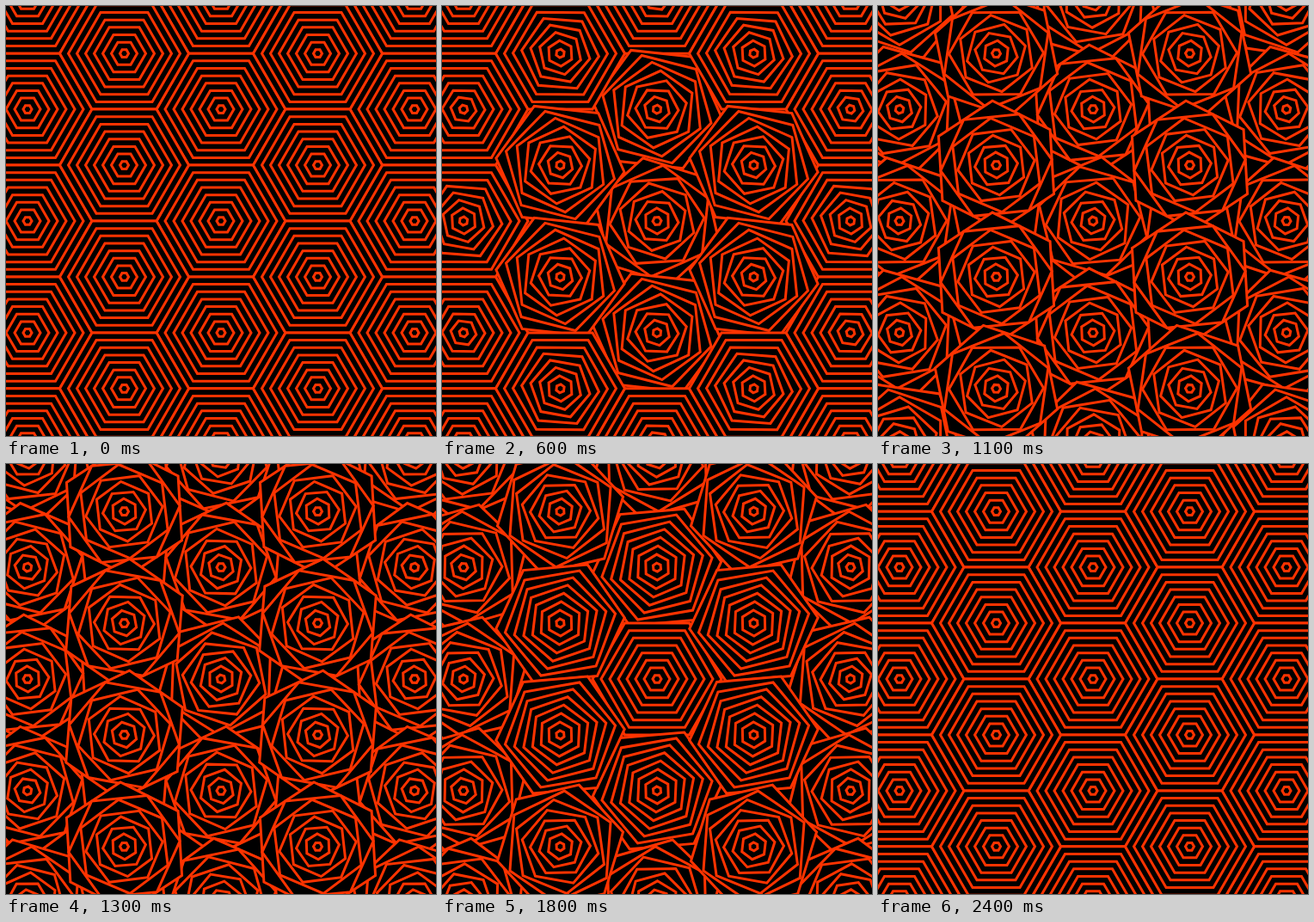
An HTML page with a canvas for the animation above (2.5 s loop, 500 by 500 pixels).

```html
<!DOCTYPE html>
<html lang="en">
<head>
<meta charset="utf-8">
<title>Turning hexagons</title>
<style>
  html, body { margin: 0; width: 100%; height: 100%; overflow: hidden; background: #000; }
  canvas { display: block; }
</style>
</head>
<body>
<canvas id="stage" width="500" height="500"></canvas>
<script>
const ctx = document.getElementById('stage').getContext('2d');
const LOOP = 2500;
const TURN_END = 1650;       // ms at which all rings of the middle cell come to rest
const DELAY_PER_PIXEL = 2.1; // the wave spreads from the middle cell
const DELAY_PER_RING = 25;   // outer rings set off later
const RINGS = 8;
const CELL = 75;
const SIXTH = Math.PI / 3;

// Later cells cover earlier ones: even columns first, each from top to bottom.
const cells = [];
for (const col of [-2, 0, 2, -1, 1]) {
  for (let row = -3; row <= 3; row++) {
    const x = col * CELL * 1.5;
    const y = (row + Math.abs(col % 2) / 2) * CELL * Math.sqrt(3);
    cells.push({ x, y, delay: Math.hypot(x, y) * DELAY_PER_PIXEL });
  }
}

function hexagon(x, y, radius, angle) {
  ctx.beginPath();
  for (let i = 0; i < 6; i++) {
    const a = angle + i * SIXTH;
    ctx.lineTo(x + radius * Math.cos(a), y + radius * Math.sin(a));
  }
  ctx.closePath();
  ctx.fill();
  ctx.stroke();
}

function draw(time) {
  ctx.setTransform(1, 0, 0, 1, 0, 0);
  ctx.fillStyle = '#000';
  ctx.fillRect(0, 0, 500, 500);
  ctx.translate(250, 250);
  ctx.strokeStyle = '#ff3300';
  ctx.lineWidth = 3;
  for (const { x, y, delay } of cells) {
    for (let ring = RINGS - 1; ring >= 0; ring--) {
      const begin = ring * DELAY_PER_RING;
      const progress = (time - delay - begin) / (TURN_END - begin);
      const turned = Math.min(1, Math.max(0, progress));
      // inner rings make more sixths of a turn than outer ones
      hexagon(x, y, 5 + ring * 10, turned * (RINGS - ring) * SIXTH);
    }
  }
}

const start = performance.now();
function tick() {
  draw((performance.now() - start) % LOOP);
  requestAnimationFrame(tick);
}
tick();
</script>
</body>
</html>
```
